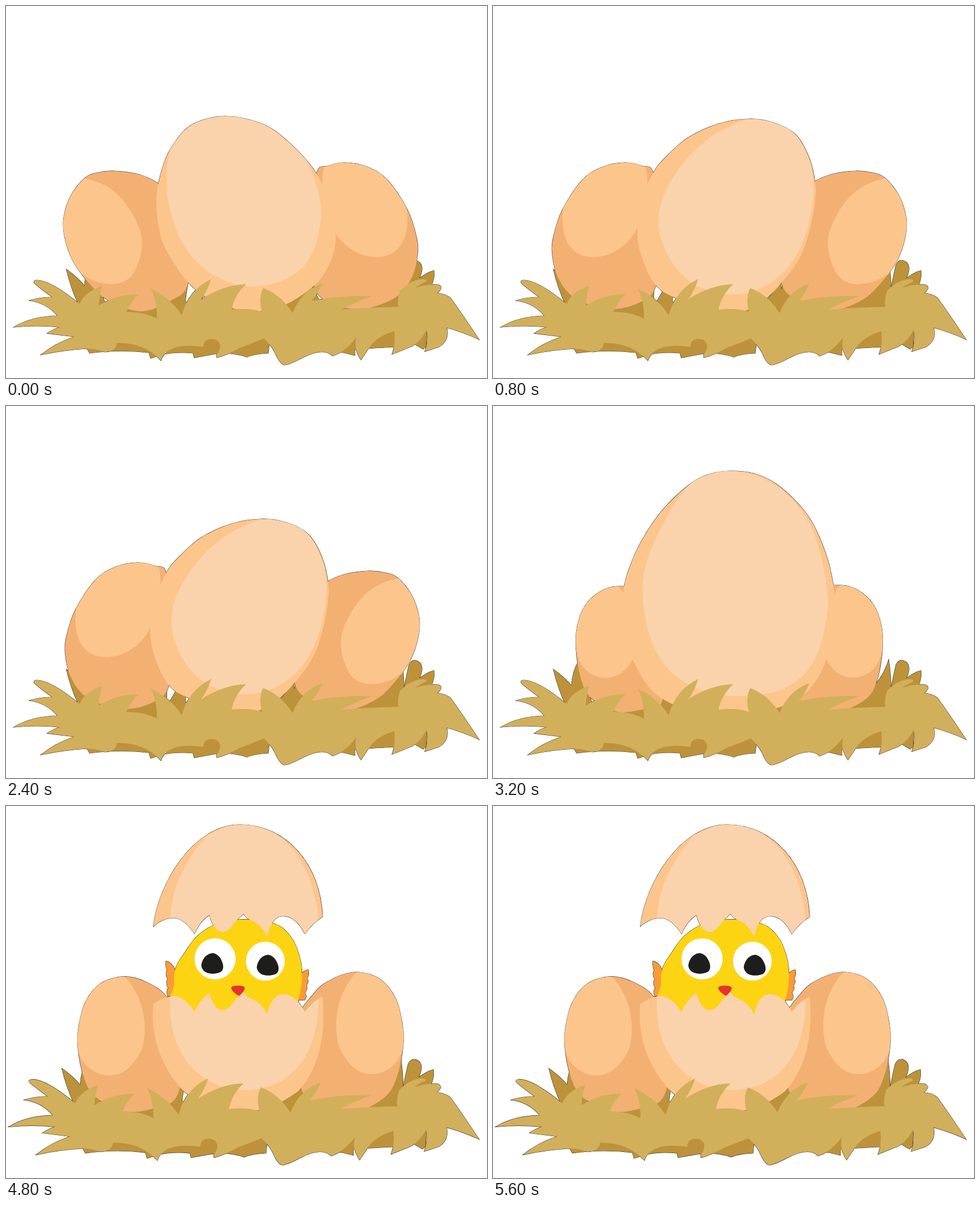
These frames come from a looping animation (851 by 658 pixels, 6.4 s). An HTML page with a canvas:

```html
<!DOCTYPE html>
<html lang="en">
<head>
<meta charset="utf-8">
<title>Hatching egg</title>
<style>
  html, body { margin: 0; width: 100%; height: 100%; overflow: hidden; background: #fff; }
  canvas { display: block; }
</style>
</head>
<body>
<canvas id="stage" width="851" height="658"></canvas>
<script>
const ctx = document.getElementById('stage').getContext('2d');
const STRAW = '#d2af5b', SHADE = '#bd923b', LIGHT = '#fad2ab', MID = '#fcc58b', DARK = '#f3b073';
const YELLOW = '#fdd412', ORANGE = '#f99b36', RED = '#e6332a', BLACK = '#1d1d1b';

const path = d => new Path2D(d);
const part = (shape, color, clip) => ({ shape, color, clip });

// Closed smooth curve through "x,y x,y ..."
function blob(text) {
  const pts = text.split(' ').map(s => s.split(',').map(Number));
  const at = i => pts[(i + pts.length) % pts.length];
  const shape = new Path2D();
  shape.moveTo(...pts[0]);
  pts.forEach((p, i) => {
    const a = at(i - 1), q = at(i + 1), b = at(i + 2);
    shape.bezierCurveTo(p[0] + (q[0] - a[0]) / 6, p[1] + (q[1] - a[1]) / 6,
      q[0] - (b[0] - p[0]) / 6, q[1] - (b[1] - p[1]) / 6, q[0], q[1]);
  });
  return shape;
}

function ellipse(x, y, rx, ry = rx) {
  const shape = new Path2D();
  shape.ellipse(x, y, rx, ry, 0, 0, 7);
  return shape;
}

const egg = (shell, base, shine, top) => [part(shell, base), part(shine, top, shell)];

// Flip around x = sum / 2, stretching upwards from the nest floor
function mirror(parts, sum, stretch = 1) {
  const flip = shape => {
    const copy = new Path2D();
    copy.addPath(shape, new DOMMatrix([-1, 0, 0, stretch, sum, 540 * (1 - stretch)]));
    return copy;
  };
  return parts.map(p => part(flip(p.shape), p.color, p.clip && flip(p.clip)));
}

// Nest
const strawLeft = 'M62,617 Q86,597 121,585 L73,579 Q83,572 95,568 Q55,564 14,568 Q45,549 91,548 ' +
  'Q72,525 41,521 Q60,515 82,515 Q64,502 52,492 Q46,486 54,485 Q78,484 130,527 ';
const strawTop = 'Q140,505 170,495 Q165,513 164,530 Q195,510 234,510 Q220,524 213,541 Q245,541 267,553 ' +
  'Q268,523 256,500 Q292,517 311,547 Q323,502 363,483 Q356,505 345,519 Q385,493 425,492 Q405,510 399,537 ' +
  'Q430,533 453,541 Q446,517 455,499 Q486,510 507,543 Q522,504 560,490 Q552,510 540,522 ' +
  'Q590,511 648,513 Q615,525 594,537 Q645,533 694,532 ';
const strawRight = 'Q692,518 697,504 Q716,484 738,483 Q746,484 743,488 Q733,491 724,499 Q745,491 765,493 ' +
  'Q772,497 769,501 Q766,506 763,508 Q778,509 787,517 Q805,542 837,590 ';
const strawBottom = 'Q812,578 780,569 Q785,592 766,603 L741,611 Q748,592 744,573 Q735,592 718,602 ' +
  'L683,616 Q690,598 687,575 Q655,585 642,605 L628,626 Q614,606 620,586 Q600,612 578,619 ' +
  'Q562,603 525,622 Q500,635 492,635 Q486,633 480,622 Q472,602 456,588 Q440,595 415,604 ' +
  'Q390,618 373,622 Q372,612 378,605 Q360,606 349,603 Q285,594 274,627 Q245,595 196,596 ' +
  'Q196,610 175,612 Q160,606 143,606 Q105,608 62,617Z';
const shadeTop = 'M128,527 Q115,500 107,466 Q128,481 139,495 Q140,470 152,450 L175,525 H230 ' +
  'Q265,525 285,496 L284,520 L290,522 Q297,510 304,498 L322,489 L317,522 L330,535 H470 ' +
  'Q495,510 509,487 L510,502 L513,491 L541,497 L560,530 L650,520 Q690,485 700,449 Q704,475 704,500 ' +
  'Q710,470 713,458 Q717,449 725,450 Q736,453 736,465 Q735,475 731,482 Q745,471 757,468 Q759,483 752,495 L745,560 ';
const shadeBottom = 'L743,602 L738,607 L723,598 L687,603 L617,607 V618 L597,613 L575,612 L470,560 L464,614 ' +
  'Q440,615 426,621 Q400,612 372,615 L333,622 L331,614 Q300,611 275,617 L256,623 L253,613 ' +
  'Q200,607 148,614 L143,605 L150,550Z';
const nestBack = [part(path(shadeTop + shadeBottom), SHADE)];
const nestFront = [
  part(path(strawLeft + strawTop + strawRight + strawBottom), STRAW),
  part(path('M349,604 Q349,589 364,589 Q379,590 379,603 Q377,615 372,615 L355,612Z'), SHADE)
];

// Eggs leaning left; the other lean mirrors the side eggs
const leanLeft = egg(
  blob('192,292 162,295 140,304 115,335 102,375 104,410 118,450 145,488 180,520 238,540 290,522 322,491 325,400 300,340 268,313 235,298'), DARK,
  path('M140,305 C175,312 202,330 222,365 Q241,397 241,420 Q240,445 227,470 C215,490 198,492 185,492 Q155,490 137,475 L90,475 V295Z'), MID);
const leanRight = egg(
  blob('600,277 570,283 549,297 535,400 545,495 575,525 630,536 690,515 718,480 728,440 726,408 710,360 675,308 640,285'), DARK,
  path('M564,280 Q555,310 565,360 L583,402 C605,435 635,444 655,444 C690,444 716,420 709,358 V270 H568Z'), MID);
const bigLeft = egg(
  blob('388,195 350,201 318,218 287,260 271,308 266,350 271,395 285,435 328,495 380,528 440,540 490,530 535,503 562,475 580,435 583,395 574,350 549,296 515,255 470,217 430,201'), MID,
  blob('388,195 340,205 300,235 287,270 284,310 290,360 310,415 345,460 390,487 432,496 480,489 520,467 545,430 557,375 553,330 535,280 510,245 465,214 430,201'), LIGHT);
const bigRight = egg(
  blob('452,200 400,208 345,233 305,268 283,296 262,345 255,395 262,440 285,490 320,515 400,541 440,541 480,520 510,490 540,450 558,405 569,350 570,315 560,270 535,227 495,206'), MID,
  blob('452,200 385,232 335,280 302,335 293,380 300,420 325,465 365,497 420,510 470,501 515,470 545,425 562,370 567,315 558,270 535,227 495,204'), LIGHT);

// Upright big egg
const lowEgg = egg(
  blob('222,319 190,328 163,353 149,390 147,430 155,480 172,515 215,539 240,541 280,532 300,515 290,400 255,330'), DARK,
  path('M215,312 L228,326 Q252,380 247,448 C232,475 215,481 197,481 C170,479 151,460 147,430 L130,420 V310Z'), MID);
const bigUpright = egg(
  blob('419,115 385,120 350,137 300,184 262,240 240,290 231,325 228,370 233,410 247,448 270,489 298,517 350,538 430,545 500,535 550,510 575,480 589,450 602,405 605,350 601,310 590,265 567,210 540,173 500,137 460,119'), MID,
  blob('419,115 375,122 340,147 300,210 272,275 265,330 275,400 305,460 350,495 400,510 440,513 500,505 545,480 575,435 590,375 592,330 580,265 560,207 520,156 470,125'), LIGHT);

// Hatched egg
const sideEgg = egg(
  blob('216,305 175,317 148,350 136,395 135,430 145,480 165,515 215,541 270,535 310,510 325,400 290,340 255,315'), DARK,
  path('M212,300 C238,325 252,360 252,395 Q252,415 247,432 C232,462 215,478 190,478 C165,478 140,460 134,430 H120 V300Z'), MID);
const crack = 'Q545,212 532,230 Q515,197 492,199 Q473,201 466,235 Q457,214 437,206 Q428,202 425,195 ' +
  'Q415,203 408,212 Q398,227 388,227 Q373,226 365,197 Q348,208 339,230 Q324,206 305,202 Q284,202 267,217';
const lowerCrack = crack.replace(/,(\d+)/g, (_, y) => ',' + (+y + 137));
const cap = egg(
  path('M267,217 C275,145 335,39 419,39 C500,39 560,110 563,200 ' + crack + 'Z'), MID,
  path('M296,240 V203 Q300,125 362,57 L419,30 L460,45 C515,65 550,130 556,203 V240Z'), LIGHT);
const cup = egg(
  path('M563,340 ' + lowerCrack + ' C260,415 287,475 325,510 Q365,541 420,543 Q475,540 520,506 C550,475 571,420 563,340Z'), MID,
  path('M296,330 V350 C294,450 358,504 428,504 C500,504 557,450 556,345 V330Z'), LIGHT);
const pupil = (x, y) => part(blob([[0, -19], [-13, -12], [-19, 3], [-12, 14], [2, 17], [16, 13], [19, 2], [12, -13]]
  .map(([dx, dy]) => [x + dx, y + dy]).join(' ')), BLACK);
const chick = [
  part(path('M289,278 Q300,280 305,294 L307,325 L303,339 H292 Q289,331 293,325 Q288,317 292,309 Q287,302 291,294 Q288,287 289,278Z'), ORANGE),
  part(path('M538,293 Q528,295 525,303 L519,346 H532 Q537,340 532,333 Q538,327 535,320 Q540,314 536,308 Q540,301 538,293Z'), ORANGE),
  part(blob('425,205 380,212 345,233 322,263 306,290 303,320 303,360 400,400 505,370 522,340 527,300 522,267 508,236 480,213'), YELLOW),
  part(ellipse(375, 274, 36), '#fff'),
  part(ellipse(463, 278, 34), '#fff'),
  pupil(370, 283),
  pupil(467, 286),
  part(path('M403,325 Q404,321 415,321 Q426,321 427,325 Q427,330 417,339 Q405,332 403,325Z'), RED)
];

const scene = (...groups) => [nestBack, ...groups, nestFront].flat();
const left = scene(leanLeft, leanRight, bigLeft);
const right = scene(mirror(leanLeft, 833), mirror(leanRight, 833), bigRight);
const upright = scene(lowEgg, mirror(lowEgg, 836, 1.009), bigUpright);
const hatched = scene(sideEgg, mirror(sideEgg, 839, 1.033), chick, cup, cap);

const STEP = 800;
const steps = [left, right, left, right, upright, hatched, hatched, hatched];

function draw(now) {
  const step = Math.floor(now / STEP) % steps.length;
  ctx.setTransform(1, 0, 0, 1, 0, 0);
  ctx.fillStyle = '#fff';
  ctx.fillRect(0, 0, 851, 658);
  // The last two steps grow slightly from the lower right corner
  if (step > 5) ctx.setTransform(1.011, 0, 0, 1.01, -837 * .011, -635 * .01);

  // Outlines go below all fills, so only the outer edge shows
  ctx.strokeStyle = '#333';
  ctx.lineWidth = 1.2;
  for (const { shape, clip } of steps[step]) if (!clip) ctx.stroke(shape);
  for (const { shape, color, clip } of steps[step]) {
    ctx.save();
    if (clip) ctx.clip(clip);
    ctx.fillStyle = color;
    ctx.fill(shape);
    ctx.restore();
  }
}

const start = performance.now();
(function tick() {
  draw(performance.now() - start);
  requestAnimationFrame(tick);
})();
</script>
</body>
</html>
```
